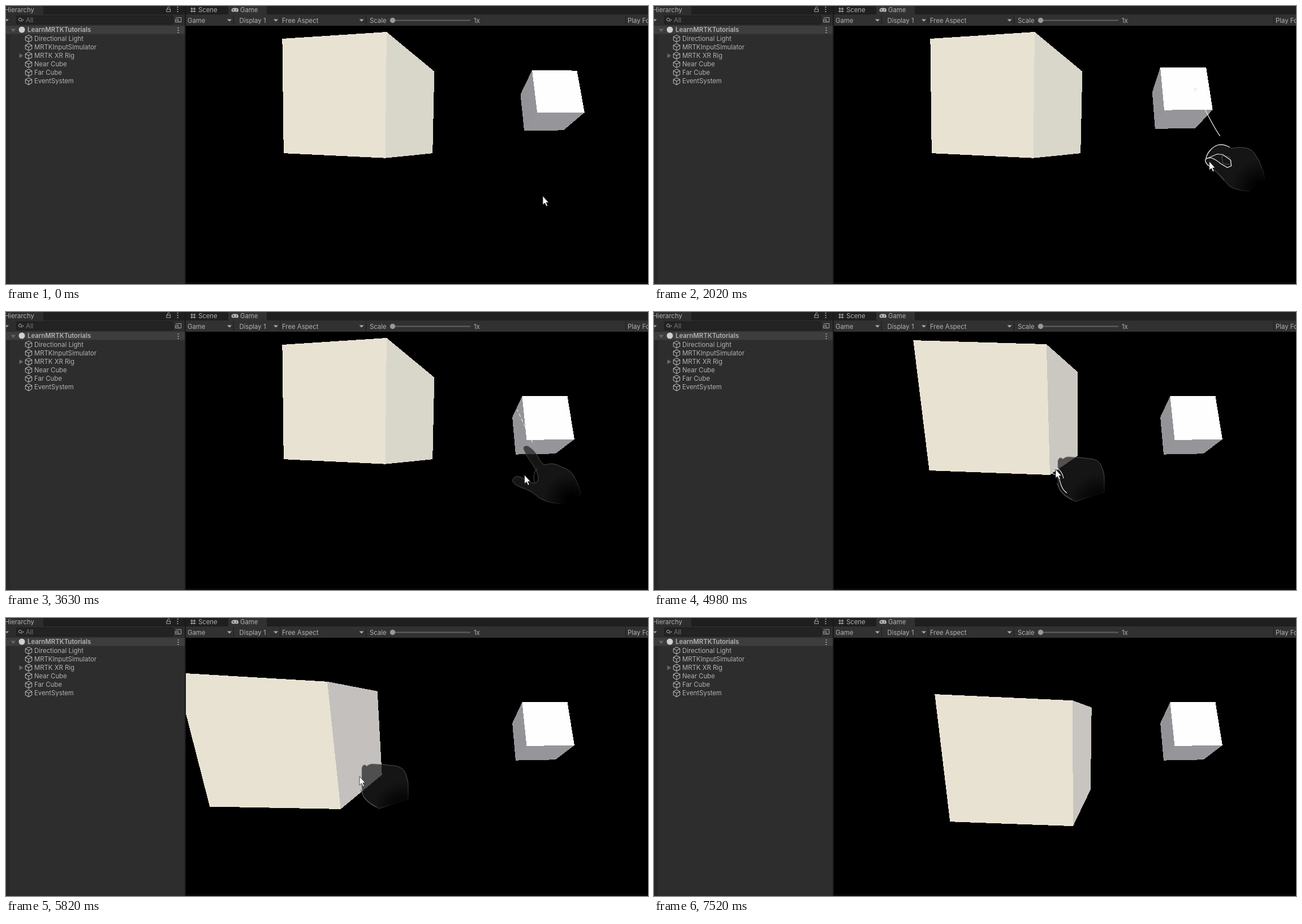
An HTML page for the animation above (8540 ms loop, 1135 by 493 pixels).

```html
<!DOCTYPE html>
<html lang="en">
<head>
<meta charset="utf-8">
<title>Cube manipulation</title>
<style>
html, body { margin: 0; width: 100%; height: 100%; overflow: hidden; background: #000; }
svg { display: block; width: 100vw; height: 100vh; }
text { font: 11.35px Inter, "Liberation Sans", sans-serif; fill: #b2b2b2; }
.cube { shape-rendering: crispEdges; }
</style>
</head>
<body>
<svg id="stage" viewBox="0 0 1135 493">
  <defs>
    <clipPath id="view"><rect x="318" y="35" width="817" height="455"/></clipPath>
  </defs>

  <rect width="1135" height="493" fill="#1f1f1f"/>
  <g id="panel">
    <path d="M0 0H66V15H316V493H0Z" fill="#2d2d2d"/>
    <path d="M0 50H7V493H0Z" fill="#282828"/>
    <path d="M0 35H316V49.500H0Z" fill="#3d3d3d"/>
    <rect x="18.500" y="17.500" width="277" height="14.500" rx="2" fill="#232323" stroke="#1a1a1a"/>
    <path d="M316 0H318V493H316Z" fill="#181818"/>
    <g fill="none" stroke="#a8a8a8">
      <rect x="284" y="5.500" width="6.500" height="4.500"/>
      <path d="M285.500 5V3.500a2 2 0 0 1 4 0"/>
      <circle cx="25" cy="24" r="2.600"/><path d="M27 26l2 2"/>
      <path d="M303 20.500H309.500V28.500H299.500V23"/>
      <circle cx="303" cy="24.500" r="1.800"/><path d="M304.500 26l2 2M300 20.500h2"/>
    </g>
    <path d="M-2 23.500H5L1.500 27ZM28.500 24H32L30.200 26Z" fill="#a8a8a8"/>
    <path d="M8.500 40.500H17L12.700 46ZM23.500 84V92.500L30.500 88.200Z" fill="#666"/>
    <circle cx="28" cy="42" r="5.500" fill="#d0d0d0"/>
  </g>

  <g id="bar">
    <path d="M393 0H461V15H1135V35H318V15H393Z" fill="#313131"/>
    <path d="M402.500 16V34M484.500 16V34M636.500 16V34M1095.500 16V34" stroke="#1c1c1c"/>
    <path d="M685 25.500H821" stroke="#626262" stroke-width="2"/>
    <circle cx="683.500" cy="25.500" r="4.700" fill="#999"/>
    <path d="M328.500 2.500V11.500M333 2.500V11.500M326 5H335.500M326 9.500H335.500" stroke="#b2b2b2" stroke-width="1.200"/>
    <path d="M402 3.500H407.500Q411 4 411 7.500T407.500 10.500Q405 9 402.500 10.500Q398.500 10.500 398.500 7.500T402 3.500Z" fill="#b8b8b8"/>
    <path d="M400.500 7H403.500M402 5.500V8.500M407.500 5.500V8.500" stroke="#313131"/>
  </g>

  <rect x="318" y="35" width="817" height="458"/>
  <path d="M318 490H1135V493H318Z" fill="#0c0808"/>

  <g clip-path="url(#view)">
    <path id="nearSide" class="cube"/>
    <path id="nearFront" class="cube" fill="#e8e2d2"/>
    <path id="farSide" class="cube" fill="#949498"/>
    <path id="farBase" class="cube" fill="#96969a"/>
    <path id="ray" fill="none" stroke="#e8e8e8" stroke-width="1.300"/>
    <circle id="ring" r="2.300" fill="none" stroke="#ddd"/>
    <path id="farFront" class="cube" fill="#fefefe"/>
    <circle id="spot" r="2" fill="none" stroke="#ddd"/>
    <g id="hands"></g>
  </g>
  <path id="cursor" d="M0 0V15.500L3.600 12.300 6.200 18.200 8.500 17.200 6 11.500H10.300Z" fill="#fff" stroke="#222" stroke-width=".8"/>
</svg>

<script>
const LOOP = 8540;
const NS = "http://www.w3.org/2000/svg";
const $ = id => document.getElementById(id);
const set = (el, attrs) => {
  for (const k in attrs) el.setAttribute(k, attrs[k]);
  return el;
};
const add = (parent, tag, attrs) => parent.appendChild(set(document.createElementNS(NS, tag), attrs));
const show = (el, on) => set(el, { visibility: on ? "visible" : "hidden" });

// Editor labels and icons
const label = (parent, x, y, str, extra = {}) => add($(parent), "text", { x, y, ...extra }).textContent = str;

label("panel", -2, 11, "Hierarchy");
label("panel", 35, 29, "All", { style: "fill:#777" });
label("panel", 38, 46, "LearnMRTKTutorials", { style: "font-weight:600" });
["Directional Light", "MRTKInputSimulator", "MRTK XR Rig", "Near Cube", "Far Cube", "EventSystem"].forEach((name, i) => {
  const y = 57.5 + i * 15.15;
  label("panel", 50, y + 4.2, name);
  add($("panel"), "path", {
    d: `M40 ${y - 6}l5.700 3v6.300l-5.700 3.200l-5.700-3.200v-6.300zM34.300 ${y - 3}l5.700 3l5.700-3M40 ${y}v6.500`,
    fill: "none", stroke: "#b0b0b0", "stroke-width": 1.1
  });
});
for (const [x, y] of [[303.5, 6], [304.5, 43]])
  for (const dy of [-4, 0, 4]) add($("panel"), "rect", { x: x - .9, y: y + dy - .9, width: 1.8, height: 1.8, fill: "#b0b0b0" });

label("bar", 340, 11, "Scene");
label("bar", 414, 11, "Game");
for (const [x, str] of [[321, "Game"], [412.5, "Display 1"], [488, "Free Aspect"], [643, "Scale"], [827, "1x"], [1099, "Play Focused"]])
  label("bar", x, 29.5, str);
for (const x of [395, 477, 628.5])
  add($("bar"), "path", { d: `M${x - 4} 23.500h8l-4 4z`, fill: "#b0b0b0" });

// Hands: body, wrist fade centre, dim and bright lines
function makeHand(id, body, fx, fy, dim, bright) {
  const g = add($("hands"), "g", {});
  for (const [name, color, alpha] of [["fill", "#1e1e1e", .7], ["line", "#777", .8]]) {
    const grad = add(g, "radialGradient", { id: id + name, gradientUnits: "userSpaceOnUse", cx: fx, cy: fy, r: 55 });
    add(grad, "stop", { offset: .2, "stop-color": color, "stop-opacity": 0 });
    add(grad, "stop", { offset: 1, "stop-color": color, "stop-opacity": alpha });
  }
  add(g, "path", { d: body, fill: `url(#${id}fill)`, stroke: `url(#${id}line)`, "stroke-width": .8 });
  add(g, "path", { d: dim, fill: "none", stroke: "#555" });
  g.bright = add(g, "path", { d: bright, fill: "none", stroke: "#f0f0f0", "stroke-width": 1.2 });
  return g;
}

const openHand = makeHand("open",
  "M20-62Q22-67 28-66Q36-62 44-52C50-42 54-30 62-30C72-34 82-32 92-26C104-22 113-15 116-8Q126 10 129 26L90 43C75 44 58 38 48 31C38 22 30 18 22 15C10 11 0 6 0 0C1-7 8-10 16-6C26-1 38 7 44 4C51 0 48-12 44-20C38-32 24-48 20-62Z",
  112, 40, "M47-24C40-16 38-4 42 4", "");
const pinchHand = makeHand("pinch",
  "M-7 0C-7-8 2-24 15-29C26-31 32-27 40-23C50-26 60-25 68-23C78-20 82-10 88-1C93 10 96 20 98 31L70 53C55 52 44 49 36 44C26 34 22 26 13 19C6 12-6 8-7 0Z",
  92, 50, "M22-10L36-8L38 6L24 4ZM3 11L13 19L26 34",
  "M-6-5C-4-16 6-26 15-29C24-31 31-28 36-25M3 11Q-8 3-7-3Q-4-7 4-6Q12-3 20 4L32 11L39 8L38-2L24-12L14-13L-4-5");
const fistHand = makeHand("fist",
  "M4-15Q7-24 13-18Q18-23 26-22Q45-21 60-19Q73-18 79-10Q86 5 86 15L86 40L35 57Q15 49 7 36Q3 25 4 3Z",
  78, 62, "M2 24Q8 44 30 54", "M-7 7Q5 10 8 22Q11 36 20 42M3-2Q12 4 14 16");

// Monotone cubic through rows of time followed by values
function sample(keys, t) {
  const last = keys.length - 1;
  t = Math.min(Math.max(t, keys[0][0]), keys[last][0]);
  const i = Math.max(0, keys.findIndex(k => k[0] >= t) - 1);
  const a = keys[i], b = keys[i + 1];
  const h = b[0] - a[0], u = (t - a[0]) / h;
  const slope = (j, c) => (keys[j + 1][c] - keys[j][c]) / (keys[j + 1][0] - keys[j][0]);
  const tangent = (j, c) => {
    if (j === 0 || j === last) return 0;
    const p = slope(j - 1, c), q = slope(j, c);
    return p * q > 0 ? 2 * p * q / (p + q) : 0;
  };
  const value = c => a[c] + (b[c] - a[c]) * u * u * (3 - 2 * u)
    + h * u * (1 - u) * ((1 - u) * tangent(i, c) - u * tangent(i + 1, c));
  return a.slice(1).map((_, c) => value(c + 1));
}

// Unit cube seen by a pinhole camera; pose = screen centre, depth, yaw, pitch, roll
const EYE = { x: 835, y: 263, focus: 405 };
const mix = (a, p, b, q) => a.map((v, i) => v * p + b[i] * q);

function projector([x, y, z, ...angles]) {
  const [yaw, pitch, roll] = angles.map(a => a * Math.PI / 180);
  const { sin, cos } = Math;
  const right = [cos(yaw), 0, -sin(yaw)];
  const down = [-sin(pitch) * sin(yaw), cos(pitch), -sin(pitch) * cos(yaw)];
  const deep = [sin(yaw) * cos(pitch), sin(pitch), cos(yaw) * cos(pitch)];
  const u = mix(right, cos(roll), down, sin(roll));
  const v = mix(down, cos(roll), right, -sin(roll));
  const mid = [(x - EYE.x) / EYE.focus * z, (y - EYE.y) / EYE.focus * z, z];
  return ([i, j, k]) => {
    const [X, Y, Z] = mid.map((m, n) => m + u[n] * i + v[n] * j + deep[n] * k);
    return `${(EYE.x + X / Z * EYE.focus).toFixed(1)} ${(EYE.y + Y / Z * EYE.focus).toFixed(1)}`;
  };
}

// Outline of the face where one axis (0 across, 1 down, 2 deep) is fixed
function face(project, axis, side) {
  const ring = [[-.5, -.5], [.5, -.5], [.5, .5], [-.5, .5]];
  return "M" + ring.map(p => project([...p.slice(0, axis), side, ...p.slice(axis)])).join("L") + "Z";
}

// Time, x, y
const CURSOR = [
  [650, 949, 337], [1190, 997, 314], [1540, 1001, 306], [2450, 962, 250], [2660, 960, 246], [3300, 990, 303],
  [3630, 917, 289], [4180, 708, 287], [4510, 708, 287], [4980, 710, 279], [5400, 700, 350], [5820, 625, 281],
  [6270, 752, 237], [7170, 741, 340]
];
// Time, x, y, depth, yaw (far cube keeps its tilt)
const FAR = [[1620, 960, 171, 5.3, -4.4], [2500, 887, 161, 5.1, -2.8], [2660, 892, 173.4, 5.06, -2.8], [3300, 944, 204, 5.28, -4]];
const FAR_TILT = [15.6, -1.2];
// Time, x, y, depth, yaw, pitch, roll
const NEAR = [
  [4680, 644.6, 177.4, 2.414, 10.8, -2.5, 2.3], [4980, 640.3, 178.3, 2.285, 1.1, -10.2, 2.1],
  [5400, 620, 246, 2.28, 0, -10.5, 2.1], [5820, 535, 213.9, 2.22, -3.8, -14.4, 2],
  [6270, 650, 165, 2.28, 0, -11, 2.2], [7170, 670.5, 242.1, 2.265, -.5, -11.6, 2.4]
];

function draw(t) {
  const [x, y] = sample(CURSOR, t);
  const near = sample(NEAR, t), far = [...sample(FAR, t), ...FAR_TILT];
  const nearView = projector(near), farView = projector(far);

  // The side darkens as it turns from the light
  const yaw = near[3], tone = 201 + 1.5 * yaw;
  set($("nearSide"), { d: face(nearView, 0, .5), fill: `rgb(${tone},${tone - 3},${tone - 8 - .7 * yaw})` });
  set($("nearFront"), { d: face(nearView, 2, -.5) });
  set($("farSide"), { d: face(farView, 0, -.5) });
  set($("farBase"), { d: face(farView, 1, .5) });
  set($("farFront"), { d: face(farView, 2, -.5) });

  const active = t >= 650 && t < 7380;
  const pinch = t >= 1600 && t < 3320;
  const fist = t >= 4690 && active;
  const open = active && !pinch && !fist;
  const shrink = t < 3320 ? 0 : .065;
  show(openHand, open);
  show(pinchHand, pinch);
  show(fistHand, fist);
  set(openHand, { transform: `translate(${x - 12 - shrink * 138} ${y + 12 - shrink * 30}) scale(${1 - shrink})` });
  for (const hand of [pinchHand, fistHand]) set(hand, { transform: `translate(${x} ${y})` });
  show(fistHand.bright, fist && t < 5400);

  const aimX = far[0] + 29, aimY = far[1] - 19;
  const endX = x - 13, endY = y - 106 - shrink * 150;
  show($("ray"), pinch || open && t < 3900);
  set($("ray"), pinch
    ? { d: `M${x + 19} ${y - 45}Q${x + 4} ${y - 66} ${aimX} ${aimY}`, "stroke-dasharray": "none" }
    : { d: `M${x + 14} ${y - 58}L${endX} ${endY}`, "stroke-dasharray": "6 4" });
  show($("ring"), open && t > 900 && t < 1600);
  set($("ring"), { cx: endX, cy: endY });
  show($("spot"), pinch);
  set($("spot"), { cx: aimX, cy: aimY });

  show($("cursor"), t < 7520);
  set($("cursor"), { transform: `translate(${x} ${y})` });
}

function tick() {
  draw(performance.now() % LOOP);
  requestAnimationFrame(tick);
}
tick();
</script>
</body>
</html>
```
